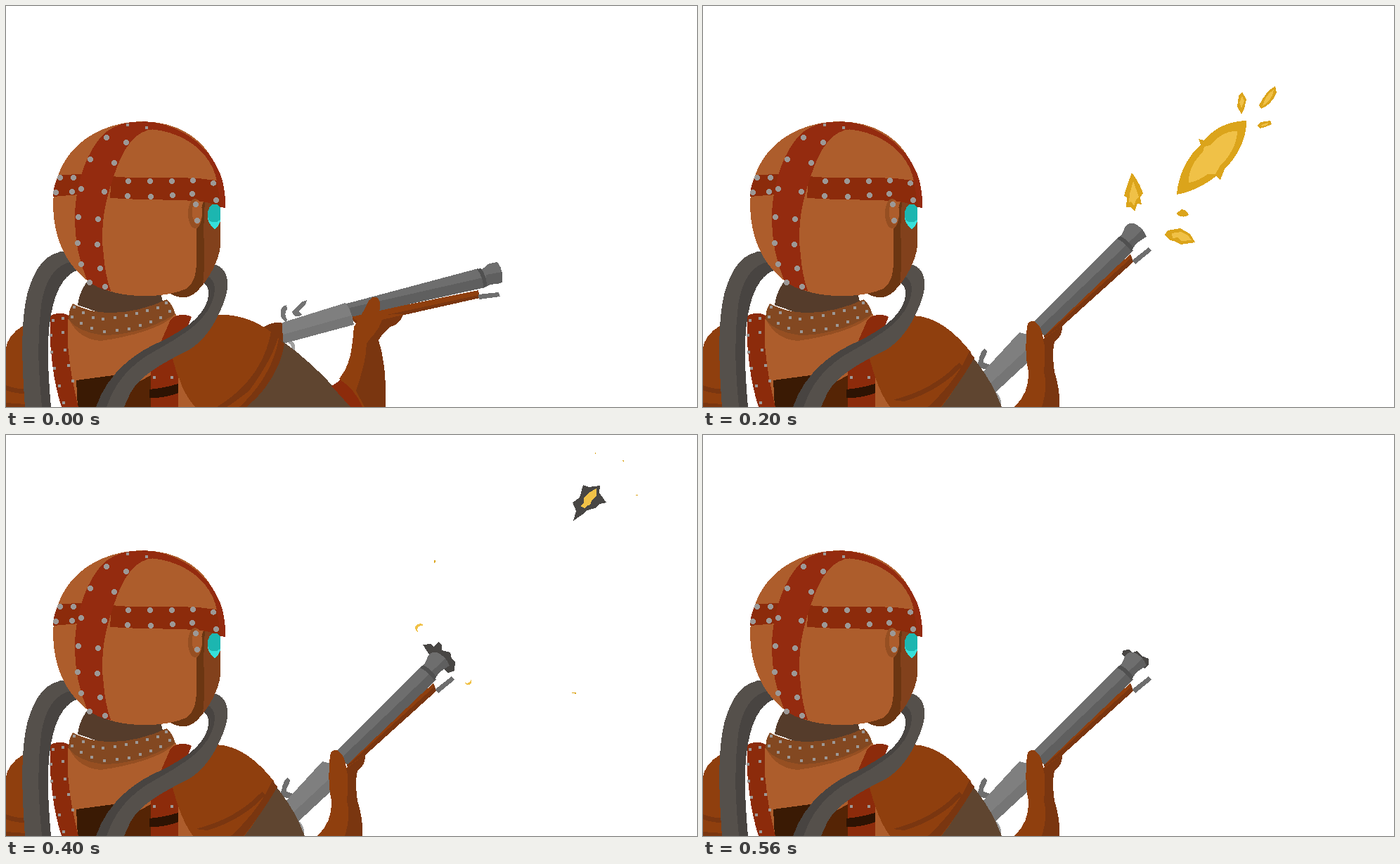
Animation, 983 px wide and 570 px high, one loop 600 ms. Source, as an HTML page:

```html
<!DOCTYPE html>
<html lang="en">
<head>
<meta charset="utf-8">
<title>Rifle shot</title>
<style>
html, body { margin: 0; width: 100%; height: 100%; overflow: hidden; background: #fff }
svg { display: block }
.skin { fill: #ad5d2c } .skinDark { fill: #964f22 } .face { fill: #82411c } .faceDark { fill: #6b3612 }
.strap { fill: #942b0f } .band { fill: #8c2b0b }
.tube { fill: #55504b } .tubeDark { fill: #484441 }
.cloth { fill: #8f3f0e } .clothDark { fill: #7a3610 } .sleeve { fill: #5f4530 }
.light { fill: #7f7f7f } .steel { fill: #6e6e6e } .steelDark { fill: #5f5f5f } .ring { fill: #505050 }
.gold { fill: #dba41b } .glow { fill: #f0c147 } .smoke { fill: #484644 }
.rivets { fill: none; stroke: #9c9896; stroke-linecap: round }
</style>
</head>
<body>
<svg width="983" height="570" viewBox="0 0 983 570" shape-rendering="crispEdges">
  <g id="torso">
    <path class="skin" d="M86 442L242 438L262 500L270 570H84Z"/>
    <path fill="#3a1a04" d="M100 532L160 524L206 540V570H102Z"/>
    <path fill="#552405" d="M178 540L206 525V570H165Z"/>
    <path class="band" d="M63 441C70 435 84 436 89 440C84 480 93 530 103 570H79C66 530 61 480 63 441ZM234 446C241 438 256 437 264 442L245 490V570H206V510Z"/>
    <path fill="#2d1303" d="M204 545Q225 543 245 537V550Q224 558 204 557Z"/>
    <path class="cloth" d="M25 454C9 463 1 476 0 486V570H28Z"/>
    <path class="clothDark" d="M0 539Q14 545 27 544V551Q12 551 0 546ZM0 564L28 566V570H0Z"/>
    <path class="rivets" stroke-width="5" data-dots="67 447 81 444 64 468 81 464 65 492 84 489 69 515 89 511 76 540 95 533 82 564 211 528 236 528"/>
  </g>

  <g data-from="0" data-to="0">
    <path class="light" d="M397 449C387 441 389 427 399 425L400 431C395 436 398 442 400 446ZM428 418C418 419 414 430 407 434C408 442 416 443 421 439L416 434C420 430 427 427 428 418Z" style="fill:#737373"/>
    <path fill="none" stroke="#a0a0a0" stroke-width="5" d="M403 477Q411 481 408 492"/>
    <path class="clothDark" d="M364 458C378 448 392 449 396 452L394 480H385Z"/>
    <path class="clothDark" d="M490 443L672 404L674 415L500 454Z"/>
    <path class="cloth" d="M490 441L672 404V411L500 448Z"/>
    <path class="steel" d="M672 410L701 407L703 413L673 417Z"/>
    <path class="steel" d="M477 425L672 373Q680 387 682 400L489 441Z"/>
    <path class="steelDark" d="M489 429L679 386L682 400L491 442Z"/>
    <path class="light" d="M393 450L483 422Q492 434 495 453L394 480Z"/>
    <path fill="#757575" d="M394 467L491 440L495 453L394 480Z"/>
    <path class="steel" d="M674 375C682 373 684 367 688 366L699 364C707 373 706 385 706 393C698 397 690 393 681 400Z"/>
    <path class="steelDark" d="M683 382L706 378V393C698 397 690 393 681 400Z"/>
    <path class="ring" d="M670 374L676 373Q684 385 684 398L679 400Q679 386 670 374Z"/>
    <path class="sleeve" d="M390 474C426 499 456 529 492 570H330Z"/>
    <path class="band" d="M463 540Q473 535 480 526L512 570H490Z"/>
    <path class="cloth" d="M495 456C503 444 511 430 516 419C523 409 533 414 532 425L531 439L565 438C561 449 554 455 546 456C539 463 533 469 530 475C538 500 541 530 540 570H507C500 553 490 541 474 530C491 509 492 488 495 456Z"/>
    <path class="clothDark" d="M565 439L535 446C531 462 517 472 513 480C512 505 505 525 498 547L510 570H540C541 530 538 500 530 475C533 469 539 463 546 456C554 455 561 449 565 439Z"/>
    <path class="cloth" d="M285 440C326 434 362 448 387 472C384 508 366 545 339 570H266C250 548 243 523 235 494Z"/>
    <path class="skin" d="M246 528Q253 552 269 570H245Z"/>
    <path class="clothDark" d="M377 463L387 472Q377 505 345 548L315 570H300Q365 530 377 463Z"/>
    <path class="cloth" d="M387 472L395 480C391 515 367 548 340 570H314Q371 538 387 472Z"/>
    <path class="clothDark" d="M388 473L396 481C391 515 368 550 342 570H332Q378 527 388 473Z"/>
  </g>

  <g data-from="1" data-to="4">
    <path class="steel" d="M400 487C392 493 394 504 390 510C393 517 401 516 407 515L408 510L399 507C398 500 404 498 404 490Z"/>
    <path class="clothDark" d="M484 466L609 354L612 364L510 456L487 475Z"/>
    <path class="cloth" d="M484 461L608 353V359L490 466Z"/>
    <path class="steel" d="M610 362L634 343L638 348L615 367Z"/>
    <path class="steel" d="M466 453L592 327L612 348L489 465L480 469Z"/>
    <path class="steelDark" d="M476 460L603 339L612 348L486 468Z"/>
    <path class="light" d="M392 527L450 464L466 468V503L413 552Z"/>
    <path fill="#757575" d="M404 541L466 483V503L413 552Z"/>
    <path fill="#9c9c9c" d="M413 546Q426 554 424 570H415Z"/>
    <path class="cloth" d="M461 455C463 448 468 446 473 449C480 454 483 464 484 473L511 454C512 466 506 473 500 477C497 490 498 506 500 520C505 536 508 552 507 570H443C459 555 464 537 463 519C458 500 459 476 461 455Z"/>
    <path class="clothDark" d="M511 454L484 474C488 486 486 506 485 520C490 538 486 557 482 570H507C508 552 505 536 500 520C498 506 497 490 500 477C506 473 512 466 511 454Z"/>
    <path class="sleeve" d="M376 490C398 515 414 540 425 570H330Z"/>
    <path class="cloth" d="M285 441C326 434 359 464 381 492C376 514 359 546 339 570H266C250 548 243 523 235 494Z"/>
    <path class="clothDark" d="M362 470L369 478Q343 525 285 551L265 570H253V558Q333 528 362 470ZM378 490L387 500Q365 543 339 570H318Q357 532 378 490Z" style="display:none"/>
    <path class="clothDark" d="M364 507L369 512Q335 548 286 562L270 560Q329 545 364 507ZM379 491L386 500Q366 535 338 570H320Q361 532 379 491Z"/>
  </g>

  <g data-from="1" data-to="1">
    <path class="gold" d="M674 268C676 238 690 213 708 197L705 189L713 191C730 170 752 164 773 163C774 185 763 211 742 232L736 247L730 242C712 256 692 265 674 268Z"/>
    <path class="glow" d="M691 251C690 232 701 217 711 208L713 200L721 198C735 182 748 177 760 178C760 196 748 216 735 228L729 239L718 239C708 246 700 250 691 251Z"/>
    <path class="gold" d="M610 237C618 246 623 258 626 266L622 272L624 282L618 281L614 292L608 286L602 286L603 272L599 270C602 257 606 248 610 237Z"/>
    <path class="glow" d="M612 249L620 271L616 276L613 284L609 278L606 279L607 267Z"/>
    <path class="gold" d="M767 122L773 133L770 146L766 154L760 143L762 128ZM814 114L816 123C811 135 803 143 794 146L791 141C798 128 804 119 814 114ZM788 170L793 165L807 163L809 168L800 172L792 174ZM673 295L681 289Q689 290 691 297Q682 303 673 295ZM657 325L661 319L679 316L693 324L700 336L680 339L670 334L664 333Z"/>
    <path class="glow" d="M767 128L770 135L766 145L763 137ZM812 119C811 130 803 138 796 142C799 131 804 124 812 119ZM794 169L804 166L803 169L795 171ZM667 323L680 321L690 326L695 333L680 334L676 329L668 330Z"/>
  </g>

  <g data-from="2" data-to="2">
    <path class="smoke" d="M710 237C714 226 720 216 726 205C719 188 723 173 722 160C726 149 735 152 743 143C753 134 766 139 778 130C788 128 796 126 803 128C808 134 803 143 809 151C812 166 805 174 806 189C808 204 804 214 796 216C788 215 783 207 772 215C762 226 752 223 744 230ZM705 246Q706 239 710 240Q709 246 705 246ZM692 258L697 253L697 256Z"/>
    <path class="gold" d="M736 206C741 183 754 158 771 145C782 137 793 135 799 137C801 152 789 174 772 188C759 196 747 198 736 206Z"/>
    <path class="glow" d="M748 192C751 178 764 162 776 152L792 143C791 160 778 173 768 182Z"/>
    <path class="gold" d="M769 95L773 101L770 109L766 103ZM834 92L834 98L827 103L825 99ZM834 163L841 160L847 163L840 167ZM609 226C617 234 617 244 611 251C602 247 602 235 609 226ZM708 304L713 305L711 307ZM704 338L710 335L729 343L727 348L707 344Z"/>
    <path class="glow" d="M769 98L771 102L769 106ZM832 95L832 98L828 101ZM609 232Q615 240 610 247Q606 240 609 232ZM710 339L724 344L713 343ZM596 267C582 262 575 273 582 282L588 289C583 277 586 269 596 270ZM647 350Q652 357 662 355Q665 347 660 341Q664 352 655 351Z"/>
    <path class="smoke" d="M596 308L593 289C597 282 604 291 609 285C617 283 625 286 624 294C622 304 634 305 640 313C646 319 645 325 655 328Q659 335 653 339C645 337 640 344 632 339L624 335Z"/>
  </g>

  <g data-from="3" data-to="3">
    <path class="smoke" d="M807 122L811 108L806 96L816 89L821 71L829 74L845 72L844 82L854 96L844 98L838 104L827 107L820 113Z"/>
    <path class="glow" d="M840 76L840 86L834 92L831 99L826 101L823 104L817 101L822 96L822 90L829 82Z"/>
    <path class="gold" d="M837 26L839 25V28ZM876 36H879V38ZM896 85H899V86H896ZM609 178H611L610 185ZM803 366L811 366V368Z"/>
    <path class="glow" d="M593 269C583 266 578 275 586 280Q583 271 593 271ZM651 351Q660 356 662 346Q664 356 655 355Z"/>
    <path class="smoke" d="M600 309L593 298L604 297L608 301L615 294L620 298V306L632 309L634 318L639 322L638 335L629 338L623 333Z"/>
  </g>
  <path class="smoke" data-from="4" data-to="4" d="M600 316L596 311L598 306L606 305L611 309L618 307L624 314L634 318L634 326L629 332Z"/>

  <g data-from="1" data-to="4">
    <path class="steel" d="M593 328C599 322 598 316 602 312Q609 306 617 311Q627 317 631 328C622 333 616 337 611 345Z"/>
    <path class="steelDark" d="M611 331L625 317L631 328C622 333 616 337 611 345L603 338Z"/>
    <path class="ring" d="M589 331L593 327Q605 332 612 344L609 349Q601 336 589 331Z"/>
  </g>

  <g id="tubes">
    <path class="tube" d="M88 348C55 349 40 374 30 410C21 450 22 500 27 570H64C58 500 58 460 67 425C73 400 86 379 104 375Z"/>
    <path class="tubeDark" d="M95 363C68 368 55 392 50 425C44 475 46 520 51 570H64C58 500 58 460 67 425C73 400 86 379 104 375Z"/>
    <path class="tube" d="M294 367C313 370 319 388 313 412C302 446 284 475 260 489C224 507 190 525 177 550L168 570H128C140 535 165 505 207 483C245 466 284 443 288 412C289 400 285 395 277 392Z"/>
    <path class="tubeDark" d="M286 383C298 390 300 403 293 421C282 450 250 469 216 488C177 508 154 536 143 570H128C140 535 165 505 207 483C245 466 284 443 288 412C289 400 285 395 277 392Z"/>
  </g>

  <g id="head">
    <path fill="#553c2b" d="M115 392C108 402 103 414 102 425L150 442L224 424L220 408Z"/>
    <path class="skinDark" d="M90 446L241 438C225 457 178 470 135 476C116 475 99 465 90 446Z"/>
    <path fill="#834821" d="M95 423C132 444 184 438 229 417Q237 424 241 438C204 461 165 468 138 468C114 465 97 457 89 446Q89 432 95 423Z"/>
    <path class="rivets" stroke-width="5" data-dots="97 428 110 436 124 443 138 445 155 443 171 440 186 437 201 433 216 429 228 422 94 442 107 451 122 458 140 463 158 461 175 459 191 454 206 449 220 443 233 434"/>
    <path class="faceDark" d="M262 270H304V335C306 352 294 382 275 402C262 417 249 418 230 407Z"/>
    <path class="face" d="M283 275L305 286V335C306 352 295 378 280 396Q284 360 281 320Z"/>
    <path class="skin" d="M193 164C120 166 66 212 67 285C68 330 84 361 106 382C126 402 158 411 190 412C217 413 241 409 256 402C268 394 271 380 271 360V318L280 280L305 250C296 200 255 164 193 164Z"/>
    <path class="band" d="M76 240L110 239L104 268L67 271Q67 253 76 240ZM150 242C200 248 250 240 299 248L309 255Q313 272 312 287L305 286C285 272 230 278 148 273Z"/>
    <path class="strap" d="M193 164C240 164 291 195 307 245Q313 268 312 287L306 286L300 249C293 211 258 180 206 175Z"/>
    <path class="strap" d="M168 167Q187 162 206 167L214 175C183 174 166 205 155 237C138 283 134 320 139 355Q141 382 149 405Q129 402 115 389C102 358 97 326 98 292C101 246 116 205 140 181Q152 171 168 167Z"/>
    <ellipse class="skinDark" cx="269" cy="295" rx="10" ry="21"/>
    <ellipse class="skin" cx="272" cy="293" rx="7" ry="17"/>
    <path fill="#36e0da" d="M293 282Q302 280 305 287V306Q301 316 297 317C284 309 284 290 293 282Z"/>
    <path fill="#1cb6b0" d="M293 282Q302 280 305 287V304Q296 311 288 304C285 295 288 286 293 282Z"/>
    <path class="rivets" stroke-width="7.5" data-dots="143 187 171 194 120 218 154 223 77 244 96 244 71 265 94 264 107 260 140 264 174 249 205 249 236 249 266 248 295 252 173 270 206 271 237 269 265 267 299 276 270 282 272 305 103 300 131 303 102 337 130 339 107 367 134 373 119 393 141 399"/>
    <path class="rivets" stroke-width="5" data-dots="173 169 200 173"/>
  </g>
</svg>
<script>
for (const path of document.querySelectorAll('.rivets'))
  path.setAttribute('d', path.dataset.dots.replace(/(\d+) (\d+)/g, 'M$1 $2h.01'));

const poses = [...document.querySelectorAll('[data-from]')];
const start = performance.now();

// The aim is held for 200 ms, each later pose for 100 ms.
function draw(now) {
  const time = Math.max(0, now - start) % 600;
  const step = Math.max(0, Math.floor(time / 100) - 1);
  for (const pose of poses)
    pose.style.display = step >= +pose.dataset.from && step <= +pose.dataset.to ? '' : 'none';
  requestAnimationFrame(draw);
}
draw(start);
</script>
</body>
</html>
```
